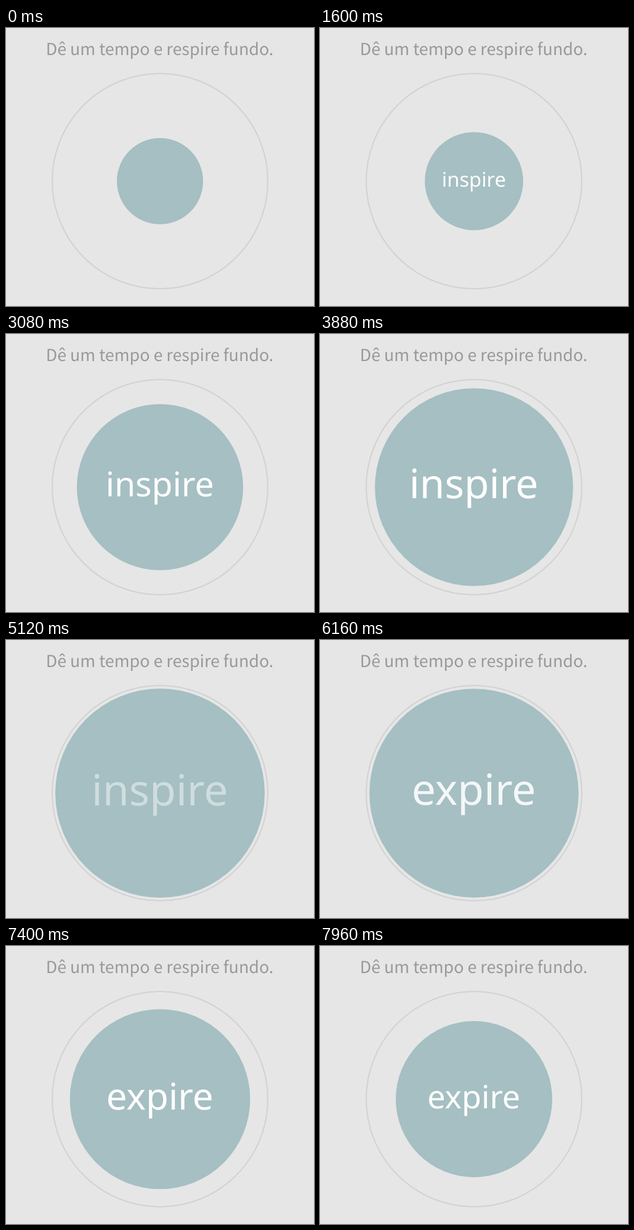
An HTML page for the animation above (8000 ms loop, 500 px wide and 452 px high).

```html
<!DOCTYPE html>
<html lang="pt">
<head>
<meta charset="utf-8">
<title>Respire</title>
<style>
  html, body { margin: 0; width: 100%; height: 100%; overflow: hidden; background: #e6e6e6; }
  svg { display: block; width: 500px; height: 452px; }
  text { text-anchor: middle; text-rendering: geometricPrecision; }
  .title { font: 26.84px "Noto Sans CJK JP", "Noto Sans CJK SC", "Noto Sans CJK", sans-serif; fill: #999; }
  .word { font: 69.6px "Noto Sans", "Open Sans", sans-serif; fill: #fff; }
</style>
</head>
<body>
<svg viewBox="0 0 500 452">
  <text class="title" x="249.5" y="44">Dê um tempo e respire fundo.</text>
  <circle cx="250" cy="249" r="175" fill="none" stroke="#d2d2d2" stroke-width="2"/>
  <g id="ball">
    <circle r="170" fill="#a5bfc2"/>
    <text class="word" id="word" x="-0.4" y="19.5"></text>
  </g>
</svg>
<script>
const LOOP = 8000, STEP = 40, FADE_STEP = 120, FADE = 680;
const SMALL = 70, BIG = 170;
const GROW = 725, GROW_TIME = 4000, SHRINK = 6130;
const FADE_OUT = 4760, SWAP = 5360, FADE_IN = 5480;

const ball = document.getElementById('ball');
const word = document.getElementById('word');

const clamp = x => Math.min(1, Math.max(0, x));

// cubic-bezier(.42, 0, .58, 1), solved by bisection
function easeInOut(x) {
  let lo = 0, hi = 1;
  for (let i = 0; i < 24; i++) {
    const s = (lo + hi) / 2;
    if (1.26 * s - .78 * s * s + .52 * s ** 3 < x) lo = s; else hi = s;
  }
  return lo * lo * (3 - 2 * lo);
}

function radius(t) {
  if (t < SHRINK) return SMALL + (BIG - SMALL) * easeInOut(clamp((t - GROW) / GROW_TIME));
  const s = (t - SHRINK) / 1000;
  return BIG - 7.6 * s - 8.68 * s * s;
}

// linear fade that advances in coarse steps
const fade = t => clamp(Math.floor(t / FADE_STEP) * FADE_STEP / FADE);

function draw(ms) {
  const t = Math.floor((ms % LOOP) / STEP) * STEP;
  const inhale = t < SWAP;
  ball.setAttribute('transform', `translate(250 249) scale(${radius(t) / BIG})`);
  word.textContent = inhale ? 'inspire' : 'expire';
  word.setAttribute('opacity', inhale ? fade(t) * (1 - fade(t - FADE_OUT)) : fade(t - FADE_IN));
}

const begin = performance.now();
function tick() {
  draw(performance.now() - begin);
  requestAnimationFrame(tick);
}
tick();
</script>
</body>
</html>
```
